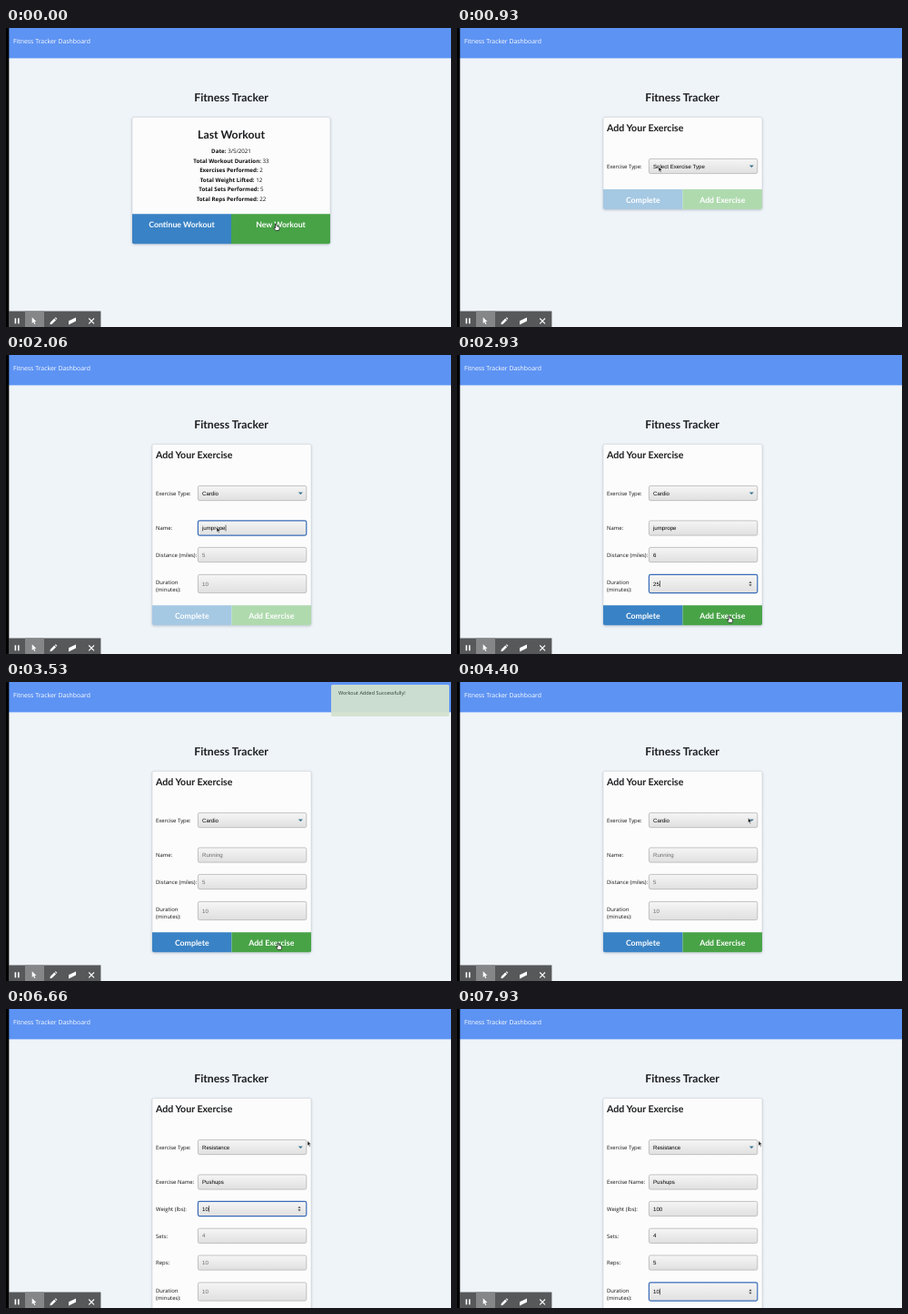
Animation of 490x330 px, one loop 8 s. Source, as an HTML page with a canvas:

```html
<!DOCTYPE html>
<html lang="en">
<head>
<meta charset="utf-8">
<title>Fitness Tracker</title>
<style>
  html, body { margin: 0; width: 100%; height: 100%; overflow: hidden; background: #eff4f9; }
  canvas { display: block; width: 490px; height: 330px; }
</style>
</head>
<body>
<canvas id="stage"></canvas>
<script>
const W = 490, H = 330, LOOP = 8000;
const canvas = document.getElementById('stage');
const ctx = canvas.getContext('2d');
const scale = window.devicePixelRatio || 1;
canvas.width = W * scale;
canvas.height = H * scale;
ctx.textRendering = 'geometricPrecision';

const LATO = 'Lato, sans-serif', BODY = '"Open Sans", sans-serif', ARIAL = '"Liberation Sans", sans-serif';
const BLUE = '#3982c5', GREEN = '#48a347', INK = '#111';

// Moments of the recorded session, in ms
const OPEN_FORM = 480, POPUP_1 = 960, CARDIO = 1260, SAVED = 3150, POPUP_2 = 4600, RESISTANCE = 5270;
const KEY_STEP = 60;
const OPTIONS = ['Select Exercise Type', 'Resistance', 'Cardio'];

// label, centre y, height, placeholder, typed value, first key time
const cardioFields = [
  ['Name:', 191, 17, 'Running', 'jumprope', 1590],
  ['Distance (miles):', 220.5, 17, '5', '6', 2150],
  ['Duration\n(minutes):', 252.5, 21, '10', '25', 2330]
];
const resistanceFields = [
  ['Exercise Name:', 191, 17, 'Bench Press', 'Pushups', 6130],
  ['Weight (lbs):', 220.5, 17, '200', '100', 6600],
  ['Sets:', 250.3, 17, '4', '4', 6900],
  ['Reps:', 280, 17, '10', '5', 7100],
  ['Duration\n(minutes):', 312, 21, '10', '10', 7350]
];

// time, x, y of the pointer tip
const pointerPath = [
  [0, 296.5, 216], [480, 296.5, 216], [860, 222, 153], [1020, 222, 153], [1240, 218, 167.5],
  [1420, 218, 167.5], [1540, 232, 190], [2560, 232, 190], [2860, 299, 288], [3900, 299, 288],
  [4330, 320.5, 150], [5060, 320.5, 150], [5250, 315.5, 146.5], [5700, 315.5, 146.5], [6000, 332, 145.5]
];

const clamp = v => Math.max(0, Math.min(1, v));
const ramp = (t, from, to) => clamp((t - from) / (to - from));
const between = (t, from, to) => t >= from && t < to;

function rect(x, y, w, h, fill) {
  ctx.fillStyle = fill;
  ctx.fillRect(x, y, w, h);
}

function paint(fill, stroke, line) {
  if (fill) { ctx.fillStyle = fill; ctx.fill(); }
  if (stroke) { ctx.strokeStyle = stroke; ctx.lineWidth = line; ctx.stroke(); }
}

function roundRect(x, y, w, h, r, fill, stroke, line = 0.8) {
  ctx.beginPath();
  ctx.roundRect(x, y, w, h, r);
  paint(fill, stroke, line);
}

function shape(points, fill, stroke, line = 0.8) {
  ctx.beginPath();
  points.forEach(([x, y]) => ctx.lineTo(x, y));
  ctx.closePath();
  paint(fill, stroke, line);
}

// y is the middle of the capitals; returns the text width
function text(str, x, y, size, family, color = INK, weight = 500, align = 'left') {
  ctx.font = `${weight} ${size}px ${family}`;
  ctx.textAlign = align;
  ctx.fillStyle = color;
  ctx.fillText(str, x, y + size * 0.36);
  return ctx.measureText(str).width;
}

const heading = (str, x, y, size, align = 'center', color = '#1c1d1f') =>
  text(str, x, y, size, LATO, color, 700, align);

function card(x, y, w, h) {
  ctx.save();
  ctx.shadowColor = 'rgba(90,105,125,.45)';
  ctx.shadowBlur = 3 * scale;
  ctx.shadowOffsetY = 0.7 * scale;
  roundRect(x, y, w, h, 2, '#fcfcfc');
  ctx.restore();
  roundRect(x, y, w, h, 2, null, '#d3d7dc', 0.6);
}

function buttonPair(x, y, w, h, labels, textY, enabled = true) {
  roundRect(x, y, w / 2, h, [0, 0, 0, 2], enabled ? BLUE : '#a5c8e3');
  roundRect(x + w / 2, y, w / 2, h, [0, 0, 2, 0], enabled ? GREEN : '#afdaae');
  labels.forEach((label, i) => heading(label, x + w * (0.25 + i / 2), textY, 8.75, 'center', '#fff'));
}

function control(y, h, focusColor, line = 1.2) {
  const fill = ctx.createLinearGradient(0, y - h / 2, 0, y + h / 2);
  fill.addColorStop(0, '#f6f6f6');
  fill.addColorStop(1, '#dfdfdf');
  roundRect(211.4, y - h / 2 + 0.4, 119.4, h - 0.8, 1.8, fill, focusColor || '#b4b4b4', focusColor ? line : 0.8);
}

function drawHome() {
  card(139, 98.5, 218, 139.5);
  heading('Last Workout', 248, 118, 12.25);
  const stats = [['Date', '3/5/2021'], ['Total Workout Duration', '33'], ['Exercises Performed', '2'],
    ['Total Weight Lifted', '12'], ['Total Sets Performed', '5'], ['Total Reps Performed', '22']];
  stats.forEach(([name, value], i) => {
    const y = 136.2 + i * 10.43, size = 6.2;
    ctx.font = `700 ${size}px ${BODY}`;
    const nameWidth = ctx.measureText(name + ':').width;
    ctx.font = `500 ${size}px ${BODY}`;
    const x = 248 - (nameWidth + ctx.measureText(' ' + value).width) / 2;
    text(name + ':', x, y, size, BODY, INK, 700);
    text(' ' + value, x + nameWidth, y, size, BODY);
  });
  buttonPair(139, 205.2, 218, 33, ['Continue Workout', 'New Workout'], 217);
}

function drawField(field, index, fields, t) {
  const [label, y, h, placeholder, value, start] = field;
  const cleared = fields === cardioFields && t >= SAVED;
  const next = fields[index + 1];
  const focusEnd = next ? next[5] - KEY_STEP : fields === cardioFields ? SAVED - 100 : LOOP;
  const focused = between(t, start - KEY_STEP, focusEnd);
  const keys = cleared ? 0 : Math.max(0, Math.floor((t - start) / KEY_STEP) + 1);
  const typed = value.slice(0, keys);

  const lines = label.split('\n');
  lines.forEach((line, i) =>
    text(line, 165, lines.length > 1 ? y - 1.5 + i * 8.3 : y + 0.3, 5.95, BODY));
  control(y, h, focused && '#386bb8');
  const width = text(typed || placeholder, 216, y, 6.1, ARIAL, typed ? '#000' : '#6c6c6c');
  if (!focused) return;
  rect(216.3 + (typed ? width : 0), y - 3.4, 0.6, 6.8, '#111');
  if (index) {
    shape([[321.4, y - 0.8], [324.6, y - 0.8], [323, y - 2.8]], '#444');
    shape([[321.4, y + 0.8], [324.6, y + 0.8], [323, y + 2.8]], '#444');
  }
}

function drawPopup(selected, hovered) {
  const row = 9, top = 152.5 - row * (selected + 0.5);
  ctx.save();
  ctx.shadowColor = 'rgba(0,0,0,.35)';
  ctx.shadowBlur = 4 * scale;
  roundRect(209, top - 2, 122, row * 3 + 4, 2, '#f4f4f4');
  ctx.restore();
  OPTIONS.forEach((option, i) => {
    const on = i === hovered;
    if (on) rect(209, top + i * row, 122, row, '#3f87ee');
    text(option, 216, top + (i + 0.5) * row, 6.1, ARIAL, on ? '#fff' : '#111');
  });
}

function drawForm(t) {
  const choice = t < CARDIO ? 0 : t < RESISTANCE ? 2 : 1;
  const fields = [[], resistanceFields, cardioFields][choice];
  const buttonY = [178, 336, 276.2][choice];
  const enabled = choice === 2 ? t >= 2330 : t >= 7350;

  card(161, 98.5, 175, buttonY - 76.5);
  heading('Add Your Exercise', 165, 110, 10.6, 'left');
  text('Exercise Type:', 165, 153, 5.95, BODY);
  const focused = between(t, CARDIO, 1530) || between(t, RESISTANCE, 6070);
  if (focused) roundRect(210.8, 143.8, 120.6, 17.4, 2.5, null, '#b4cdea', 1.8);
  control(152.5, 17, focused && '#83a5cf', 0.9);
  text(OPTIONS[choice], 216, 152.5, 6.1, ARIAL, '#000');
  shape([[321.8, 151.4], [326.8, 151.4], [324.3, 154.1]], '#33708f');
  fields.forEach((field, i) => drawField(field, i, fields, t));
  buttonPair(161, buttonY, 175, 22, ['Complete', 'Add Exercise'], buttonY + 11.7, enabled);

  if (between(t, POPUP_1, CARDIO)) drawPopup(0, t < 1070 ? 0 : t < 1150 ? 1 : 2);
  if (between(t, POPUP_2, RESISTANCE)) drawPopup(2, t < 5160 ? 2 : 1);
}

function drawToast(t) {
  const alpha = Math.min(ramp(t, 3260, 3400), 1 - ramp(t, 3800, 4000));
  if (!alpha) return;
  ctx.globalAlpha = alpha;
  roundRect(358, 3, 130, 35, 1.5, 'rgba(211,226,206,.93)');
  text('Workout Added Successfully!', 366, 12, 5.5, BODY, '#24402c');
  ctx.globalAlpha = 1;
}

function drawToolbar() {
  rect(3, 312.5, 101.4, 17.5, '#57585a');
  rect(21, 312.5, 21, 17.5, '#858688');
  rect(9.6, 320.3, 1.6, 6, '#fff');
  rect(13, 320.3, 1.6, 6, '#fff');
  arrow(28.7, 319.3, 1, '#fff');
  shape([[48.4, 327.2], [48.8, 325], [53.2, 320.6], [55, 322.4], [50.6, 326.8]], '#fff');
  shape([[53.8, 320], [54.7, 319.2], [56.4, 320.9], [55.6, 321.8]], '#fff');
  shape([[69, 323.2], [77, 319.4], [77, 323.5], [69, 327.6]], '#fff');
  ctx.strokeStyle = '#fff';
  ctx.lineWidth = 1.1;
  ctx.beginPath();
  ctx.moveTo(91.2, 320.5); ctx.lineTo(97, 326.3);
  ctx.moveTo(97, 320.5); ctx.lineTo(91.2, 326.3);
  ctx.stroke();
}

function arrow(x, y, size, fill, stroke) {
  const outline = [[0, 0], [0, 6.6], [1.5, 5.2], [2.6, 7.7], [3.7, 7.2], [2.6, 4.8], [4.7, 4.7]];
  shape(outline.map(([dx, dy]) => [x + dx * size, y + dy * size]), fill, stroke, 0.6);
}

function hand(x, y) {
  const outline = [[0, 0], [1.2, 0], [1.4, 2.6], [4.6, 3.4], [4.6, 5.6], [3.8, 7.6], [0.6, 7.6], [-1.8, 4.8], [-1.2, 4.2], [0, 5]];
  shape(outline.map(([dx, dy]) => [x + dx, y + dy]), '#fff', '#222', 0.8);
}

function drawPointer(t) {
  let i = pointerPath.findIndex(key => key[0] > t);
  if (i < 0) i = pointerPath.length;
  const from = pointerPath[i - 1], to = pointerPath[i] || from;
  const p = to === from ? 0 : ramp(t, from[0], to[0]);
  const eased = p * p * (3 - 2 * p);
  const x = from[1] + (to[1] - from[1]) * eased;
  const y = from[2] + (to[2] - from[2]) * eased;
  const overButton = t < OPEN_FORM ? y > 205 : y > 276;
  overButton ? hand(x, y) : arrow(x, y, 0.85, '#111', '#eee');
}

function draw(t) {
  ctx.setTransform(scale, 0, 0, scale, 0, 0);
  rect(0, 0, W, H, '#eff4f9');
  rect(0, 0, W, 33.4, '#5d93f3');
  rect(0, 0, 3.3, H, '#000');
  text('Fitness Tracker Dashboard', 8, 14.2, 6.9, BODY, '#fff');
  heading('Fitness Tracker', 248, 76.5, 12.25);
  t < OPEN_FORM ? drawHome() : drawForm(t);
  drawToast(t);
  drawToolbar();
  drawPointer(t);
}

const startTime = performance.now();
function tick() {
  draw((performance.now() - startTime) % LOOP);
  requestAnimationFrame(tick);
}
tick();
</script>
</body>
</html>
```
